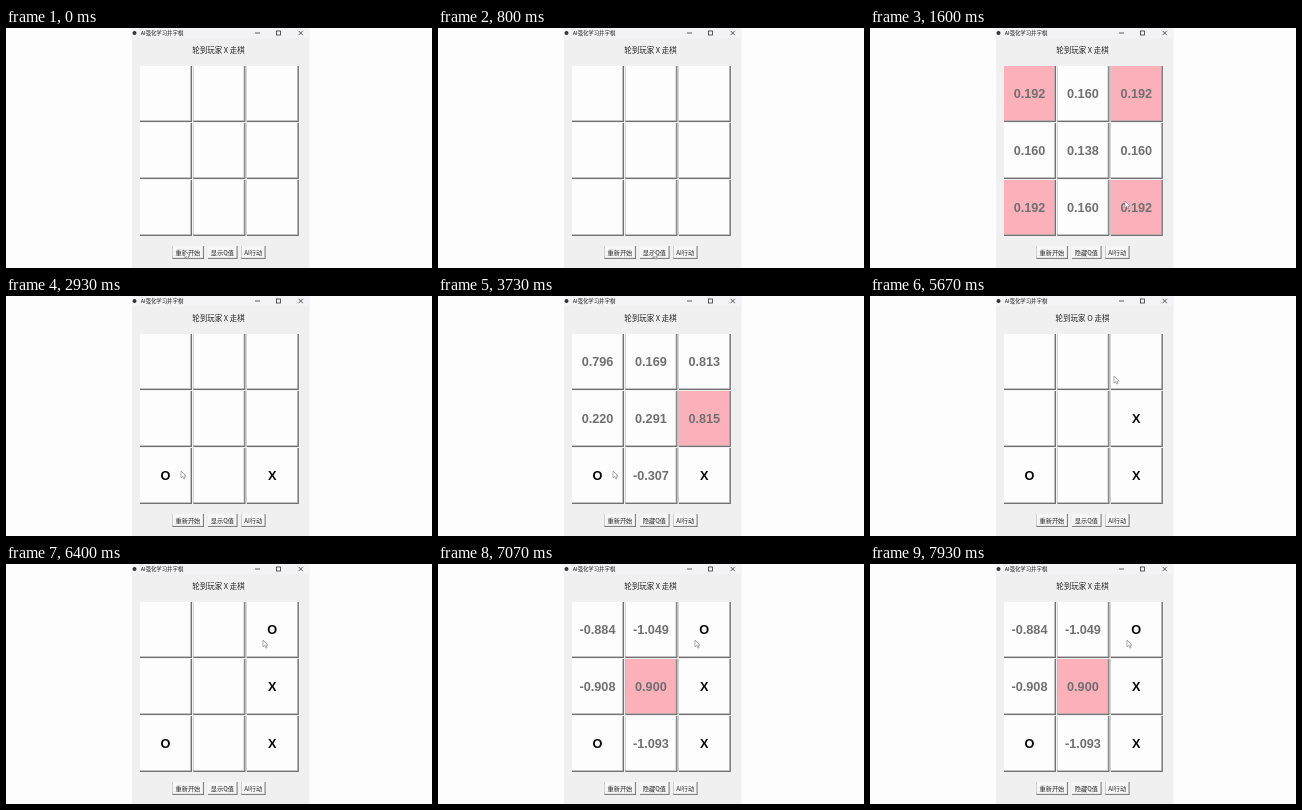
An HTML page for the animation above (8000 ms loop, 426 by 240 pixels).

```html
<!DOCTYPE html>
<html lang="zh-CN">
<head>
<meta charset="utf-8">
<title>井字棋</title>
<style>
  html, body { margin: 0; width: 100%; height: 100%; overflow: hidden; background: #fdfdfd; }
  svg { display: block; width: 100%; height: 100%; }
  text { font-family: "Noto Sans CJK SC", "Noto Sans CJK", sans-serif; fill: #222; text-anchor: middle; }
  .mark { font: bold 12.7px "Liberation Sans", Arial, sans-serif; }
</style>
</head>
<body>
<svg viewBox="0 0 426 240">
  <rect width="426" height="240" fill="#fdfdfd"/>
  <rect x="126" width="177.5" height="240" fill="#f0f0f1"/>
  <rect x="126" width="177.5" height="10" fill="#f3f3f5"/>
  <circle cx="128.5" cy="5" r="2" fill="#333"/>
  <text x="156" y="7" font-size="5.4">AI强化学习井字棋</text>
  <g fill="none" stroke="#333" stroke-width=".8">
    <path d="M249 5h5M292.5 2.8l4.4 4.4m0-4.4l-4.4 4.4"/>
    <rect x="270.5" y="3" width="4" height="4"/>
  </g>
  <text id="status" x="212.5" y="25" font-size="7.5"></text>
  <g id="board"></g>
  <g id="buttons"></g>
  <path id="cursor" d="M0 0V8.2L2 6.5L3.4 9.5L4.7 8.9L3.4 6H6Z" fill="#fff" stroke="#777" stroke-width=".7"/>
</svg>
<script>
const LOOP = 8000;
const $ = id => document.getElementById(id);

function add(parent, tag, attrs) {
  const el = document.createElementNS("http://www.w3.org/2000/svg", tag);
  for (const key in attrs) el.setAttribute(key, attrs[key]);
  return parent.appendChild(el);
}

// A raised button: light face with a dark lower right edge.
function raised(parent, x, y, w, h, edge, face) {
  add(parent, "rect", { x, y, width: w, height: h, fill: "#696969" });
  add(parent, "rect", { x, y, width: w - edge / 2, height: h - edge / 2, fill: "#a8a8a8" });
  return add(parent, "rect", { x, y, width: w - edge, height: h - edge, fill: face });
}

const cells = Array.from({ length: 9 }, (_, i) => {
  const x = 134 + (i % 3) * 53.4, y = 38 + Math.floor(i / 3) * 57;
  return {
    face: raised($("board"), x, y, 52, 56, 1.7, "#fdfdfd"),
    text: add($("board"), "text", { x: x + 25.5, y: y + 32.3, class: "mark" })
  };
});

function button(x, w, label) {
  raised($("buttons"), x, 218, w, 13, 1.2, "#f6f6f7");
  const text = add($("buttons"), "text", { x: x + w / 2 - .3, y: 226.6, "font-size": 6.2 });
  text.textContent = label;
  return text;
}
button(166.5, 31.5, "重新开始");
const toggle = button(202, 29.5, "显示Q值");
button(235.5, 24, "AI行动");

const scenes = [
  { at: 0, turn: "X", marks: {} },
  { at: 900, turn: "X", marks: {}, best: [0, 2, 6, 8],
    q: [.192, .16, .192, .16, .138, .16, .192, .16, .192] },
  { at: 1870, turn: "O", marks: { 8: "X" } },
  { at: 2670, turn: "X", marks: { 6: "O", 8: "X" } },
  { at: 3730, turn: "X", marks: { 6: "O", 8: "X" }, best: [5],
    q: [.796, .169, .813, .22, .291, .815, 0, -.307, 0] },
  { at: 5270, turn: "O", marks: { 5: "X", 6: "O", 8: "X" } },
  { at: 6000, turn: "X", marks: { 2: "O", 5: "X", 6: "O", 8: "X" } },
  { at: 6670, turn: "X", marks: { 2: "O", 5: "X", 6: "O", 8: "X" }, best: [4],
    q: [-.884, -1.049, 0, -.908, .9, 0, 0, -1.093, 0] }
];

// Cursor stops: time, x, y.
const path = [
  [0, 179, 223], [300, 179, 223], [750, 215, 223], [1000, 215, 223],
  [1500, 255, 173], [2000, 255, 173], [2500, 175, 175], [4600, 175, 175],
  [5100, 255, 122], [5350, 255, 122], [5670, 244, 80], [5900, 257, 76], [LOOP, 257, 76]
];

function cursorAt(t) {
  const i = path.findIndex(stop => stop[0] > t);
  const [t0, x0, y0] = path[i - 1], [t1, x1, y1] = path[i];
  const k = (t - t0) / (t1 - t0), e = k * k * (3 - 2 * k);
  return [x0 + (x1 - x0) * e, y0 + (y1 - y0) * e];
}

let shown;
function showScene(scene) {
  if (scene === shown) return;
  shown = scene;
  const { turn, marks, q, best = [] } = scene;
  $("status").textContent = `轮到玩家 ${turn} 走棋`;
  toggle.textContent = q ? "隐藏Q值" : "显示Q值";
  cells.forEach(({ face, text }, i) => {
    text.textContent = marks[i] || (q ? q[i].toFixed(3) : "");
    text.style.fill = marks[i] ? "#080808" : "#707070";
    face.setAttribute("fill", best.includes(i) ? "#fcb0b9" : "#fdfdfd");
  });
}

function draw(now) {
  const t = now % LOOP;
  showScene(scenes.filter(scene => scene.at <= t).pop());
  $("cursor").setAttribute("transform", `translate(${cursorAt(t)}) scale(.85)`);
  requestAnimationFrame(draw);
}
draw(performance.now());
</script>
</body>
</html>
```
